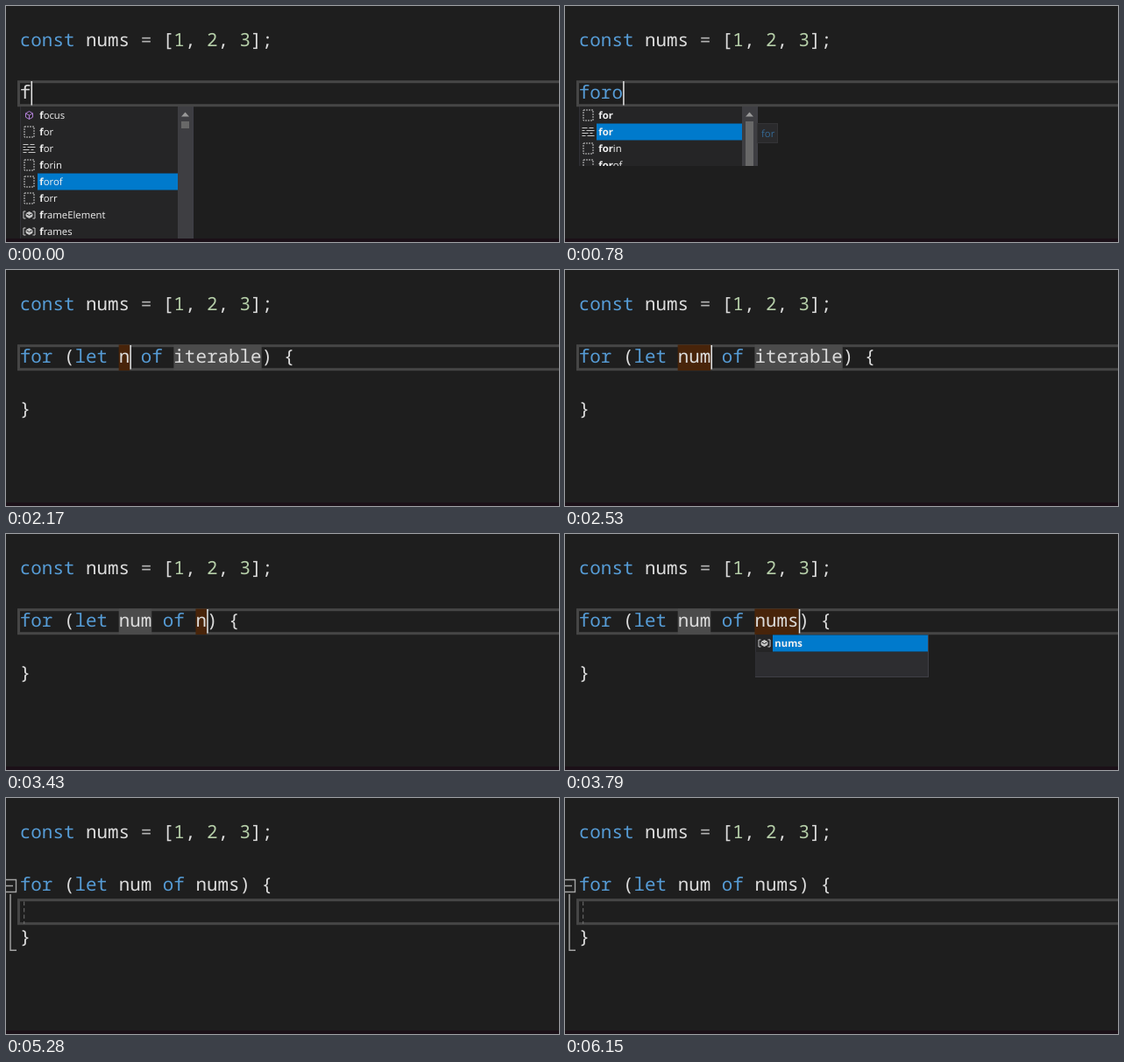
Write an HTML page that moves like this. It is 631x270 px and loops after 6270 ms.

```html
<!DOCTYPE html>
<html lang="en">
<head>
<meta charset="utf-8">
<title>Loop snippet in a code editor</title>
<style>
  html, body { margin: 0; width: 100%; height: 100%; overflow: hidden; background: #1e1e1e; }
  svg { display: block; width: 631px; height: 270px; }
  text { white-space: pre; text-rendering: geometricPrecision; }
  .code { font: 20.9px "Noto Sans Mono", monospace; fill: #dcdcdc; }
  .ui { font: 11.3px "Open Sans", "Noto Sans", sans-serif; fill: #f1f1f1; }
  .match { font-weight: 700; }
  .key { fill: #569cd6; }
  .num { fill: #b5cea8; }
  .op { fill: #b4b4b4; }
  .icon { fill: none; stroke: #c8c8c8; }
</style>
</head>
<body>
<svg viewBox="0 0 631 270">
  <defs>
    <clipPath id="full"><rect width="631" height="266"/></clipPath>
    <clipPath id="short"><rect width="631" height="183"/></clipPath>
  </defs>
  <g id="stage"></g>
  <rect y="266" width="631" height="4" fill="#1b1018"/>
</svg>
<script>
const LOOP = 6270, LEFT = 15.8, CHAR = 12.54, LINE = 30, ROW = 19;
const BROWN = '#48240a', GREY = '#4b4b4b', SELECTION = '#264f78';
const stage = document.getElementById('stage');

const colX = col => LEFT + col * CHAR;
const lineY = line => 25 + line * LINE;
const rect = (x, y, w, h, fill, extra = '') =>
  `<rect x="${x}" y="${y}" width="${w}" height="${h}" fill="${fill}" ${extra}/>`;

// Code text
const paint = text => text.replace(/\b(const|let|of|for)\b|\d|=/g, (token, key) =>
  `<tspan class="${key ? 'key' : token === '=' ? 'op' : 'num'}">${token}</tspan>`);
const code = (line, text, style = '') =>
  `<text class="code ${style}" x="${LEFT}" y="${lineY(line) + 21}">${text}</text>`;
const lineBox = line =>
  `<rect x="14.5" y="${lineY(line) + 1.7}" width="630" height="27" fill="none" stroke="#464646" stroke-width="3"/>`;
const caret = (line, col) => rect(colX(col) + .2, lineY(line) + 1, 1.5, 27.5, '#e6e6e6');
const mark = (col, length, fill) => rect(colX(col), lineY(2) + .5, length * CHAR, 29.5, fill);

// Completion list
const icons = {
  snippet: '<rect x="-5.5" y="-6" width="11" height="12" stroke-dasharray="2 1"/>',
  keyword: '<path d="M-7-4.5h6M1-4.5h5M-7-1.5h3M-2-1.5h9M-7 1.5h7M2 1.5h3M-7 4.5h4M-1 4.5h8"/>',
  method: '<path d="M0-4.5 4-2.2V2.2L0 4.5-4 2.2V-2.2ZM-4-2.2 0 0 4-2.2M0 0V4.5" stroke="#b180d7"/>',
  field: '<path d="M-4-4h-2.5v8H-4M4-4h2.5v8H4"/><path d="M0-3.5 3.5-1.5V1.5L0 3.5-3.5 1.5V-1.5Z" fill="#c8c8c8"/><path d="M-3-1 0 .5 3-1" stroke="#252526"/>'
};

function popup({ x = 16, width = 198, height = 160, rows, selected, typed, thumb, bar }) {
  const top = 115, inner = width - (thumb ? 18 : 1);
  let out = rect(x, top, width, height, '#3f3f46') + rect(x + .5, top, width - 1.5, height - 1, '#252526');
  rows.forEach(([kind, label], i) => {
    const y = top + .5 + i * ROW;
    if (i === selected) out += rect(x + 20, y, inner - 20, ROW, '#007acc');
    out += `<g class="icon" transform="translate(${x + 10.5} ${y + 9.5})">${icons[kind]}</g>
      <text class="ui" x="${x + 22.3}" y="${y + 13.6}"><tspan class="match">${label.slice(0, typed)}</tspan>${label.slice(typed)}</text>`;
  });
  if (thumb) {
    const sx = x + inner;
    out += rect(sx, top, 17, height, '#3e3e42') +
      `<path d="M${sx + 4} 126.5l4.5-5 4.5 5z" fill="#999"/>` + rect(sx + 4, 132, 9, thumb, '#686868');
  }
  if (bar) out += rect(x + .5, 135, width - 1.5, 28, '#2d2d30');
  return out;
}

const tooltip = rect(219.5, 134.5, 23, 22, '#2a2a2c', 'stroke="#343436"') +
  '<text class="ui" x="224" y="150" style="fill:#356a96">for</text>';

const snippet = label => ['snippet', label];
const firstList = popup({
  rows: [['method', 'focus'], snippet('for'), ['keyword', 'for'], snippet('forin'), snippet('forof'),
    snippet('forr'), ['field', 'frameElement'], ['field', 'frames']],
  selected: 4, typed: 1, thumb: 8
});
const forList = popup({
  width: 204, typed: 3, selected: 1, thumb: 108,
  rows: [snippet('for'), ['keyword', 'for'], snippet('forin'), snippet('forof'), snippet('forr'),
    ['field', 'FormData'], ['field', 'format'], ['field', 'forward']]
});
const single = (x, row, typed) => popup({ x, height: 49, rows: [row], selected: 0, typed, bar: true });
const forofList = single(16, snippet('forof'), 5);
const numsList = typed => popup({
  x: 217, typed, selected: 0, thumb: 60,
  rows: ['num', 'nums', 'Number', 'null', 'name', 'navigator', 'Node', 'NodeList'].map(s => ['field', s])
});

// Scenes
const word = (text, style, list = '', clip = 'full') =>
  lineBox(2) + code(2, text, style) + caret(2, text.length) + `<g clip-path="url(#${clip})">${list}</g>`;

const block = (name, iter) => code(2, paint(`for (let ${name} of ${iter}) {`)) + code(4, '}');

function fields(name, iter, active, selected, list = '') {
  const spots = [[9, name.length], [13 + name.length, iter.length]];
  const marks = spots.map(([col, length], i) =>
    mark(col, length, i !== active ? GREY : selected ? SELECTION : BROWN)).join('');
  const [col, length] = spots[active];
  return (selected ? '' : lineBox(2)) + marks + block(name, iter) + caret(2, col + length) +
    `<g clip-path="url(#full)">${list}</g>`;
}

const outline = `<g fill="none" stroke="#a5a5a5">
  <path d="M-1 93.5H11.5V107.5H-1M0 100.5H8" stroke-width="1.4"/>
  <path d="M5 110V174.3H12" stroke-width="1.4"/>
  <path d="M20.7 118.5V144" stroke="#707070" stroke-dasharray="4.5 3"/></g>`;
const done = (blink, margin) => lineBox(3) + block('num', 'nums') +
  (blink ? caret(3, 4) : '') + (margin ? outline : '');

const scenes = [
  [0, word('f', '', firstList)],
  [130, word('fo', '', firstList)],
  [280, word('for', 'key', forList)],
  [780, word('foro', 'key', forList + tooltip, 'short')],
  [930, word('forof', 'key', forofList)],
  [1180, word('forof', '', forofList)],
  [1300, word('forof', '')],
  [1550, block('item', 'iterable')],
  [1670, fields('item', 'iterable', 0, true)],
  [2170, fields('n', 'iterable', 0)],
  [2290, fields('nu', 'iterable', 0)],
  [2410, fields('num', 'iterable', 0)],
  [2930, fields('num', 'iterable', 1, true)],
  [3430, fields('num', 'n', 1)],
  [3550, fields('num', 'nu', 1, false, numsList(2))],
  [3670, fields('num', 'num', 1, false, numsList(3))],
  [3790, fields('num', 'nums', 1, false, single(217, ['field', 'nums'], 4))],
  [4160, fields('num', 'nums', 1)],
  [4530, done(true, false)],
  [5030, done(false, false)],
  [5280, done(false, true)],
  [5530, done(true, true)],
  [6150, done(false, true)]
];

const heading = code(0, paint('const nums = [1, 2, 3];'));
let shown;
function draw() {
  const time = performance.now() % LOOP;
  const scene = scenes.findLast(([start]) => start <= time);
  if (scene !== shown) {
    stage.innerHTML = heading + scene[1];
    shown = scene;
  }
  requestAnimationFrame(draw);
}
draw();
</script>
</body>
</html>
```
